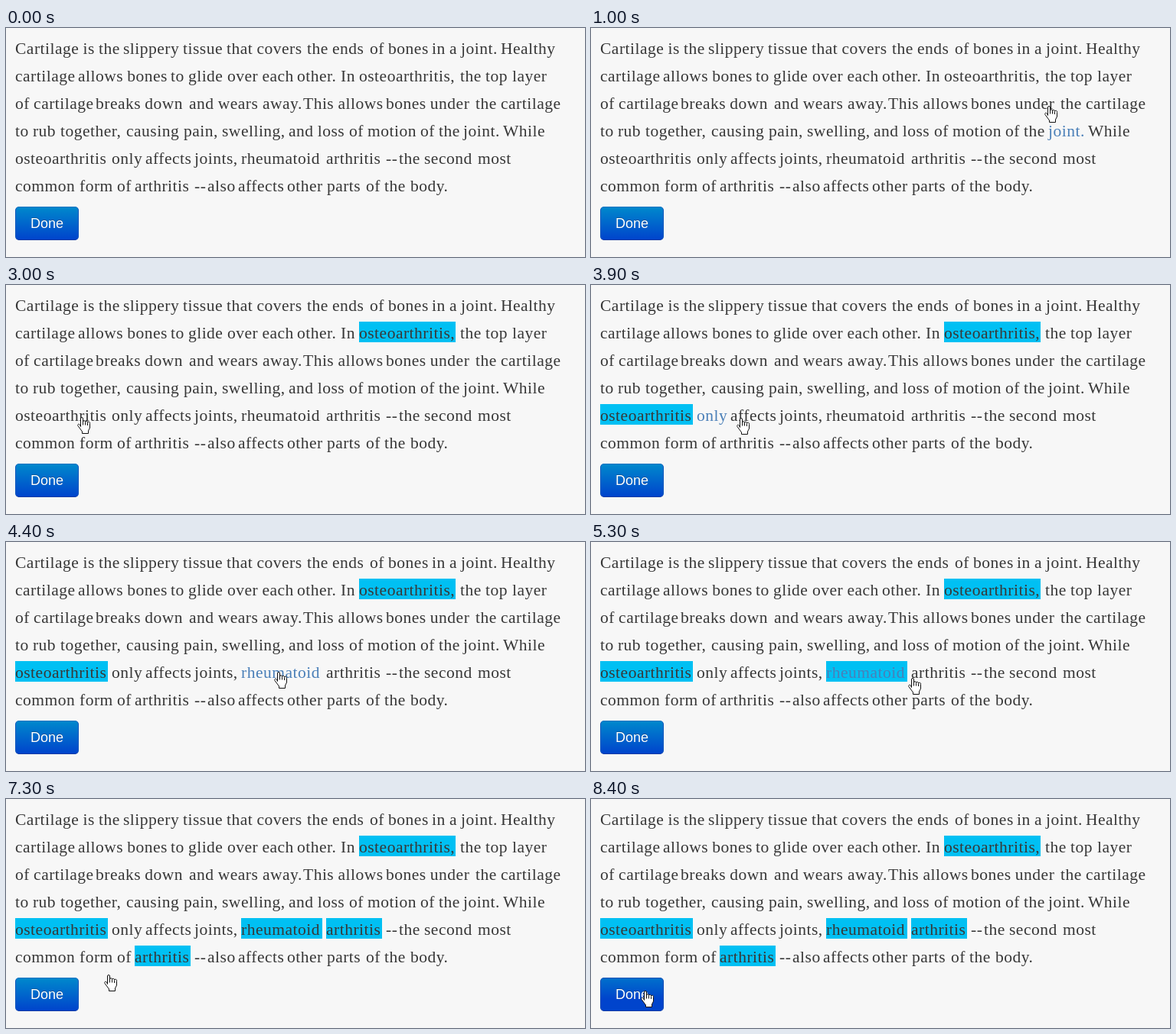
Recreate the animation shown at these times as an HTML page. Size 756 px wide and 300 px high, loop 9000 ms.

```html
<!DOCTYPE html>
<html lang="en">
<head>
<meta charset="utf-8">
<title>Highlight the key words</title>
<style>
  html, body { margin: 0; width: 100%; height: 100%; overflow: hidden; background: #f7f7f7; }
  body { position: relative; }
  .phrase, .mark, #done, #hand { position: absolute; }
  .phrase {
    font: 21.5px/36px "Liberation Serif", "Times New Roman", serif;
    letter-spacing: .5px; word-spacing: -.7px; white-space: pre; color: #373737;
  }
  .hover { color: #4a7fb8; }
  .mark { height: 27px; background: #00c0f3; }
  #done {
    left: 12px; top: 234px; width: 83px; height: 44px; box-sizing: border-box;
    border: 1px solid; border-color: #0b72c0 #0a55bb #0a3aa4; border-radius: 5px;
    background: #04c linear-gradient(#08c, #04c) 0 0 no-repeat;
    font: 18px/42px "Liberation Sans", Arial, sans-serif; color: #fff; text-align: center;
    text-shadow: 0 -1px rgba(0, 0, 0, .25);
  }
  #done.over { background-position: 0 -15px; border-color: #0a50b4 #0a48b4 #0a3aa4; }
  #hand { left: 0; top: 0; }
</style>
</head>
<body>
<div id="done">Done</div>
<svg id="hand" width="18" height="23">
  <path fill="#fff" stroke="#111" stroke-linejoin="round" d="M4.5 12.5V2a1.5 1.5 0 0 1 3 0V6a1.5 1.5 0 0 1 3 .5
    a1.5 1.5 0 0 1 3 .7a1.5 1.5 0 0 1 3 1.3V14l-2 4v3.5h-8V19l-5.5-7.5c-1-2 1-3 2.5-1.5z
    M7.5 6v4.5M10.5 6.5v4M13.5 7.5v3.5"/>
</svg>
<script>
const LOOP = 9000, STEP = 100, LINE = 36, TIP = 6;

// Each line holds phrases with their left edge.
const lines = [
  [[12, 'Cartilage is the'], [153, 'slippery'], [231, 'tissue'], [288, 'that covers'], [393, 'the ends'],
   [475, 'of bones'], [556, 'in a'], [594, 'joint.'], [646, 'Healthy']],
  [[12, 'cartilage'], [94, 'allows bones'], [215, 'to glide'], [289, 'over each'], [380, 'other.'], [437, 'In'],
   [461, 'osteoarthritis,'], [593, 'the top'], [661, 'layer']],
  [[12, 'of cartilage'], [117, 'breaks down'], [239, 'and wears'], [335, 'away.'], [388, 'This allows'],
   [496, 'bones under'], [613, 'the'], [646, 'cartilage']],
  [[12, 'to rub'], [71, 'together,'], [157, 'causing'], [232, 'pain,'], [282, 'swelling,'], [369, 'and loss'],
   [448, 'of motion'], [541, 'of the'], [597, 'joint.'], [649, 'While']],
  [[12, 'osteoarthritis'], [138, 'only'], [182, 'affects'], [246, 'joints,'], [307, 'rheumatoid'],
   [418, 'arthritis'], [496, '--'], [513, 'the second'], [616, 'most']],
  [[12, 'common'], [96, 'form of'], [168, 'arthritis'], [246, '--'], [263, 'also'], [303, 'affects'],
   [367, 'other parts'], [470, 'of the'], [528, 'body.']]
];

// Clicked words: time, line, left, right.
const clicks = [
  [1800, 1, 461, 587], [3400, 4, 12, 133], [4900, 4, 307, 413], [5800, 4, 418, 491], [6900, 5, 168, 241]
];

// Pointer path: time, x, y.
const path = [
  [800, 660, 150], [1200, 523, 53], [2200, 523, 53], [3000, 93, 173], [3500, 93, 173], [3900, 190, 174],
  [4400, 350, 170], [4900, 350, 170], [5300, 414, 178], [5600, 444, 172], [5900, 444, 172],
  [6500, 211, 201], [6900, 211, 201], [7600, 65, 251], [LOOP, 65, 251]
];

const done = document.getElementById('done');
const hand = document.getElementById('hand');

function add(tag, className, parent = document.body) {
  const el = document.createElement(tag);
  el.className = className;
  if (parent === document.body) parent.insertBefore(el, done);
  else parent.append(el);
  return el;
}

const marks = clicks.map(([time, line, left, right]) => {
  const el = add('div', 'mark');
  el.style.cssText = `left:${left}px; top:${12 + line * LINE}px; width:${right - left}px`;
  return { el, time };
});

const words = [];
lines.forEach((phrases, row) => phrases.forEach(([x, text]) => {
  const phrase = add('div', 'phrase');
  phrase.style.cssText = `left:${x}px; top:${9 + row * LINE}px`;
  text.split(' ').forEach((word, i) => {
    if (i) phrase.append(' ');
    const el = add('span', '', phrase);
    el.textContent = word;
    words.push({ el, box: el.getBoundingClientRect() });
  });
}));

function pointerAt(time) {
  const next = path.findIndex(key => key[0] > time);
  if (next < 1) return null;
  const [t0, x0, y0] = path[next - 1], [t1, x1, y1] = path[next];
  const k = (time - t0) / (t1 - t0);
  return { x: Math.round(x0 + (x1 - x0) * k), y: Math.round(y0 + (y1 - y0) * k) };
}

function inside(box, pointer) {
  if (!pointer) return false;
  const x = pointer.x + TIP, y = pointer.y;
  return x >= box.left && x <= box.right && y >= box.top && y <= box.bottom;
}

const doneBox = done.getBoundingClientRect();

function draw(now) {
  const time = Math.floor(now % LOOP / STEP) * STEP;
  const pointer = pointerAt(time);
  const felt = pointerAt(time - STEP); // the page reacts one step late

  hand.style.display = pointer ? '' : 'none';
  if (pointer) hand.style.transform = `translate(${pointer.x}px, ${pointer.y}px)`;
  for (const { el, time: start } of marks) el.style.display = time >= start ? '' : 'none';
  for (const { el, box } of words) el.className = inside(box, felt) ? 'hover' : '';
  done.className = inside(doneBox, felt) ? 'over' : '';
}

const start = performance.now();
function tick() {
  draw(performance.now() - start);
  requestAnimationFrame(tick);
}
tick();
</script>
</body>
</html>
```
